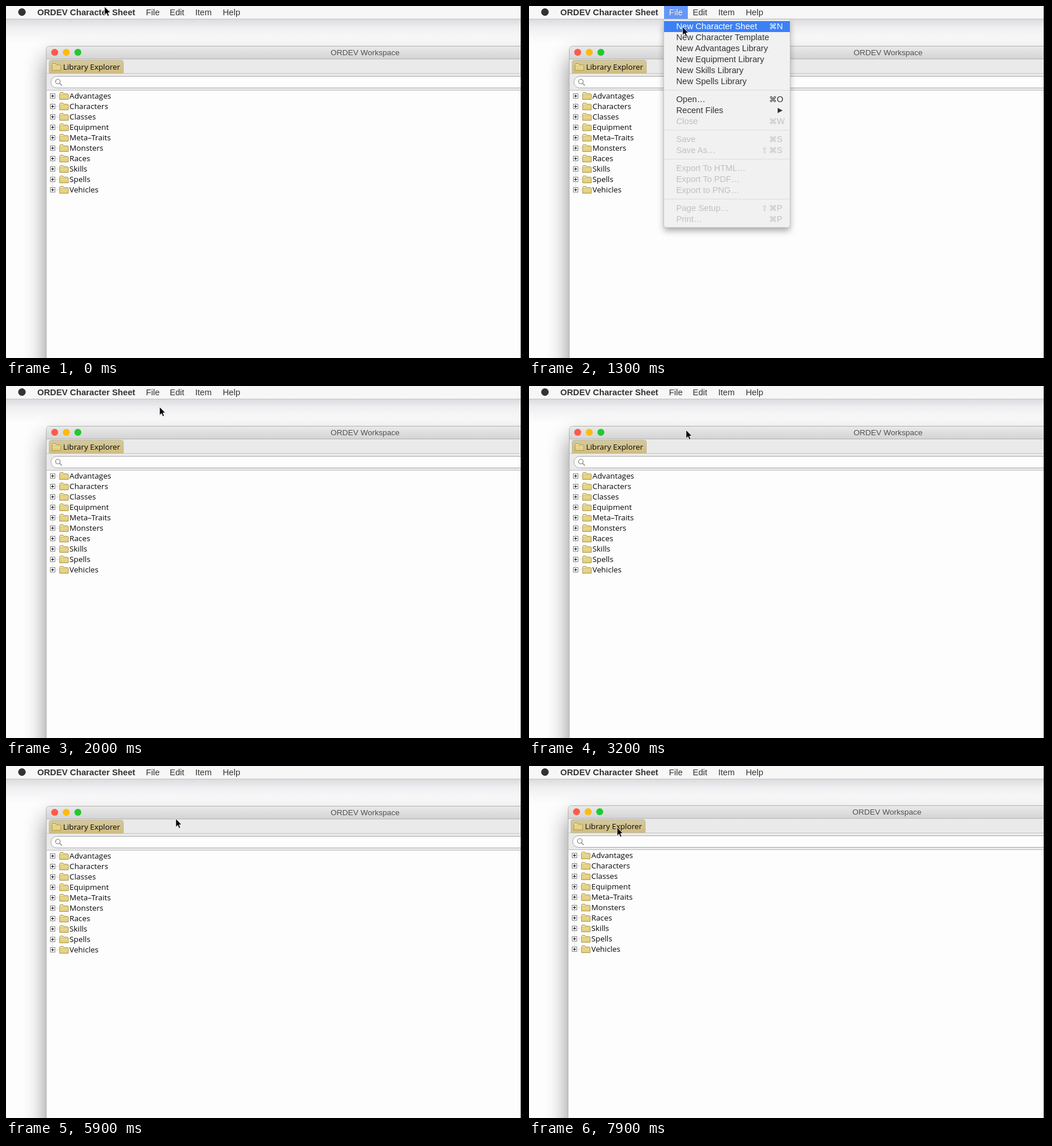
An HTML page for the animation above (8 s loop, 892 px wide and 608 px high).

```html
<!DOCTYPE html>
<html lang="en">
<head>
<meta charset="utf-8">
<title>Library workspace</title>
<style>
html, body { margin: 0; width: 100%; height: 100%; overflow: hidden; background: #fdfdfd; }
svg { display: block; width: 892px; height: 608px; }
text { white-space: pre; }
.bar, .menu { font: 14.6px "Liberation Sans", Arial, sans-serif; fill: #333; }
.app { font-size: 14.7px; font-weight: bold; }
.title { font: 13.5px "Liberation Sans", Arial, sans-serif; fill: #505050; }
.tree { font: 13.3px "Open Sans", "Noto Sans", sans-serif; fill: #080808; }
.key { font: 13.5px "DejaVu Sans", sans-serif; }
.off { fill: #c0c0c0; }
.lit, .lit text { fill: #fff; }

#cursor, #win, #menu, #file, #pick, #ring { animation: 8s linear infinite; }
#cursor { animation-name: point; }
#win { animation-name: drag; }
#menu { animation-name: drop; }
#file { animation-name: open; }
#pick { animation-name: pick; }
#ring { animation-name: press; }

@keyframes point {
  0% { transform: translate(170px, 1px); animation-timing-function: steps(4); }
  5%, 6.25% { transform: translate(254px, 10px); animation-timing-function: steps(3); }
  10% { transform: translate(265px, 33px); animation-timing-function: steps(1); }
  12.5%, 28.75% { transform: translate(265px, 36px); animation-timing-function: steps(9); }
  40%, 51.25% { transform: translate(271px, 76px); animation-timing-function: steps(5); }
  57.5%, 58.75% { transform: translate(277px, 104px); animation-timing-function: steps(9); }
  70%, 73.75% { transform: translate(293px, 91px); animation-timing-function: steps(5); }
  80%, 82.5% { transform: translate(283px, 83px); animation-timing-function: steps(2); }
  85%, 87.5% { transform: translate(281px, 82px); animation-timing-function: steps(5); }
  93.75%, 95% { transform: translate(186px, 133px); animation-timing-function: steps(3); }
  98.75%, 100% { transform: translate(152px, 106px); }
}
@keyframes drag {
  0%, 82.5% { transform: translate(0, 0); animation-timing-function: steps(2); }
  85%, 100% { transform: translate(-2px, -1px); }
}
@keyframes drop {
  0% { opacity: 0; animation-timing-function: steps(1); }
  6.25% { opacity: 1; }
  18.75% { opacity: 1; animation-timing-function: steps(3); }
  22.5%, 100% { opacity: 0; }
}
@keyframes open {
  0% { opacity: 0; animation-timing-function: steps(1); }
  6.25% { opacity: 1; animation-timing-function: steps(1); }
  18.75%, 100% { opacity: 0; }
}
@keyframes pick {
  0% { opacity: 0; animation-timing-function: steps(1); }
  8.75%, 100% { opacity: 1; }
}
@keyframes press {
  0% { opacity: 0; animation-timing-function: steps(1); }
  82.5% { opacity: 1; animation-timing-function: steps(1); }
  87.5%, 100% { opacity: 0; }
}
</style>
</head>
<body>
<svg viewBox="0 0 892 608">
  <defs>
    <linearGradient id="barShade" x2="0" y2="1">
      <stop stop-color="#dcdce0"/>
      <stop offset=".35" stop-color="#efeff1"/>
      <stop offset="1" stop-color="#fdfdfd"/>
    </linearGradient>
    <linearGradient id="titleFill" x2="0" y2="1">
      <stop stop-color="#e9e9e9"/><stop offset="1" stop-color="#d3d3d3"/>
    </linearGradient>
    <linearGradient id="tabFill" x2="0" y2="1">
      <stop stop-color="#d2c8a2"/><stop offset="1" stop-color="#d3bd7c"/>
    </linearGradient>
    <linearGradient id="folderFill" x2="0" y2="1">
      <stop stop-color="#f0e3a0"/><stop offset="1" stop-color="#dfcb78"/>
    </linearGradient>
    <filter id="soft" x="-20%" y="-20%" width="140%" height="140%"><feGaussianBlur stdDeviation="19"/></filter>
    <filter id="softMenu" x="-20%" y="-20%" width="140%" height="140%"><feGaussianBlur stdDeviation="6"/></filter>
    <g id="folder" stroke="#ad9a55">
      <path d="M.5 12.5V2.5L1.5 .5H6.5L7.5 2.5H14.5L15.5 3.5V12.5Z" fill="url(#folderFill)"/>
      <path d="M1 4.5H15" stroke="#cbb970" stroke-width=".8"/>
    </g>
    <g id="plus" fill="none">
      <rect x=".5" y=".5" width="8" height="8" fill="#fff" stroke="#858585"/>
      <path d="M2 4.5H7M4.5 2V7" stroke="#000"/>
      <path d="M10 4.5H15" stroke="#c8c8c8" stroke-dasharray="1 1"/>
    </g>
  </defs>

  <rect width="892" height="608" fill="#fdfdfd"/>
  <rect y="23" width="892" height="40" fill="url(#barShade)"/>

  <g id="win">
    <rect x="70" y="90" width="1100" height="800" opacity=".48" filter="url(#soft)"/>
    <path d="M69.5 700V75.5Q69.5 69.5 75.5 69.5H900V700Z" fill="#fdfdfd" stroke="#b2b2b2"/>
    <path d="M70 92V75.5Q70 70 75.5 70H900V92Z" fill="url(#titleFill)"/>
    <rect x="70" y="92" width="830" height="54" fill="#eaeaea"/>
    <path d="M70 91.5H900" stroke="#b2b2b2"/>
    <path d="M70 116.5H900" stroke="#c6c6c6"/>
    <path d="M70 145.5H900" stroke="#bcbcbc"/>
    <circle cx="84" cy="80" r="6" fill="#fb5a4c"/>
    <circle cx="104" cy="80" r="6" fill="#fcbb12"/>
    <circle cx="124" cy="80" r="6" fill="#1fca30"/>
    <text class="title" x="560" y="85">ORDEV Workspace</text>
    <path d="M74.5 116V97.5Q74.5 93.5 78.5 93.5H198.5Q202.5 93.5 202.5 97.5V116Z" fill="url(#tabFill)" stroke="#c0b896"/>
    <use href="#folder" x="79" y="99"/>
    <text class="tree" x="98.5" y="110">Library Explorer</text>
    <rect x="77.5" y="121.5" width="860" height="20" rx="10" fill="#fdfdfd" stroke="#a8a8a8"/>
    <g fill="none" stroke="#808080" stroke-width="1.2">
      <circle cx="89.5" cy="130.5" r="4"/><path d="M92.5 133.5L96.5 137.5"/>
    </g>
    <g id="rows" class="tree"></g>
  </g>

  <rect width="892" height="22" fill="#f7f7f7"/>
  <path d="M0 22.5H892" stroke="#c2c2c4"/>
  <rect id="file" x="233" width="41" height="22" fill="#6497fa"/>
  <g class="bar">
    <circle cx="27.5" cy="10.5" r="6.5"/>
    <text class="app" x="54" y="16">ORDEV Character Sheet</text>
    <text x="241.5" y="16">File</text>
    <text x="282.5" y="16">Edit</text>
    <text x="326.5" y="16">Item</text>
    <text x="374" y="16">Help</text>
  </g>

  <g id="menu" class="menu">
    <rect x="233" y="30" width="217" height="358" fill="#000" opacity=".35" filter="url(#softMenu)"/>
    <path d="M232.5 23H450.5V377.5Q450.5 382.5 445.5 382.5H237.5Q232.5 382.5 232.5 377.5Z" fill="#f1f1f1" stroke="#c4c4c4"/>
    <text class="lit" x="241.5" y="16">File</text>
    <g id="items"></g>
    <path d="M429 176V185L437.5 180.5Z"/>
    <g id="pick" class="lit">
      <rect x="233" y="26" width="217" height="19" fill="#3c80f7"/>
      <g id="picked"></g>
    </g>
  </g>

  <g id="cursor">
    <circle id="ring" cy="1" r="20.7" fill="none" stroke="#000" stroke-width="2.8"/>
    <path d="M0 0V14.5L3.3 11.4L5.6 16.6L8 15.6L5.8 10.5H10Z" fill="#000" stroke="#fff" stroke-width=".8"/>
  </g>
  <rect x="888" width="4" height="608" fill="#000"/>
</svg>
<script>
const $ = id => document.getElementById(id);
const text = (x, y, s, cls = "") => `<text x="${x}" y="${y}" class="${cls}">${s}</text>`;

const folders = ["Advantages", "Characters", "Classes", "Equipment", "Meta–Traits",
  "Monsters", "Races", "Skills", "Spells", "Vehicles"];
$("rows").innerHTML =
  '<path d="M80.5 151V313" stroke="#c8c8c8" stroke-dasharray="1 1"/>' +
  folders.map((name, i) => {
    const y = 149 + 18 * i;
    return `<use href="#plus" x="76" y="${y + 2}"/><use href="#folder" x="92" y="${y}"/>` +
      text(109.5, y + 11, name);
  }).join("");

// label, shortcut letter, disabled, shifted; null is a separator
const entries = [
  ["New Character Sheet", "N"], ["New Character Template"], ["New Advantages Library"],
  ["New Equipment Library"], ["New Skills Library"], ["New Spells Library"], null,
  ["Open…", "O"], ["Recent Files"], ["Close", "W", 1], null,
  ["Save", "S", 1], ["Save As…", "S", 1, 1], null,
  ["Export To HTML…", "", 1], ["Export To PDF…", "", 1], ["Export to PNG…", "", 1], null,
  ["Page Setup…", "P", 1, 1], ["Print…", "P", 1]
];

function entry([label, key, off, shift], y) {
  const cls = off ? "off" : "";
  let out = text(254, y, label, cls);
  if (key) out += text(414, y, "⌘", "key " + cls) + text(427.5, y, key, cls);
  if (shift) out += text(401, y, "⇧", "key " + cls);
  return out;
}

let y = 40, list = "";
for (const e of entries) {
  if (e) {
    list += entry(e, y);
    y += 19;
  } else {
    list += `<path d="M233 ${y - 8.5}H450" stroke="#dcdcdc"/>`;
    y += 12;
  }
}
$("items").innerHTML = list;
$("picked").innerHTML = entry(entries[0], 40);
</script>
</body>
</html>
```
